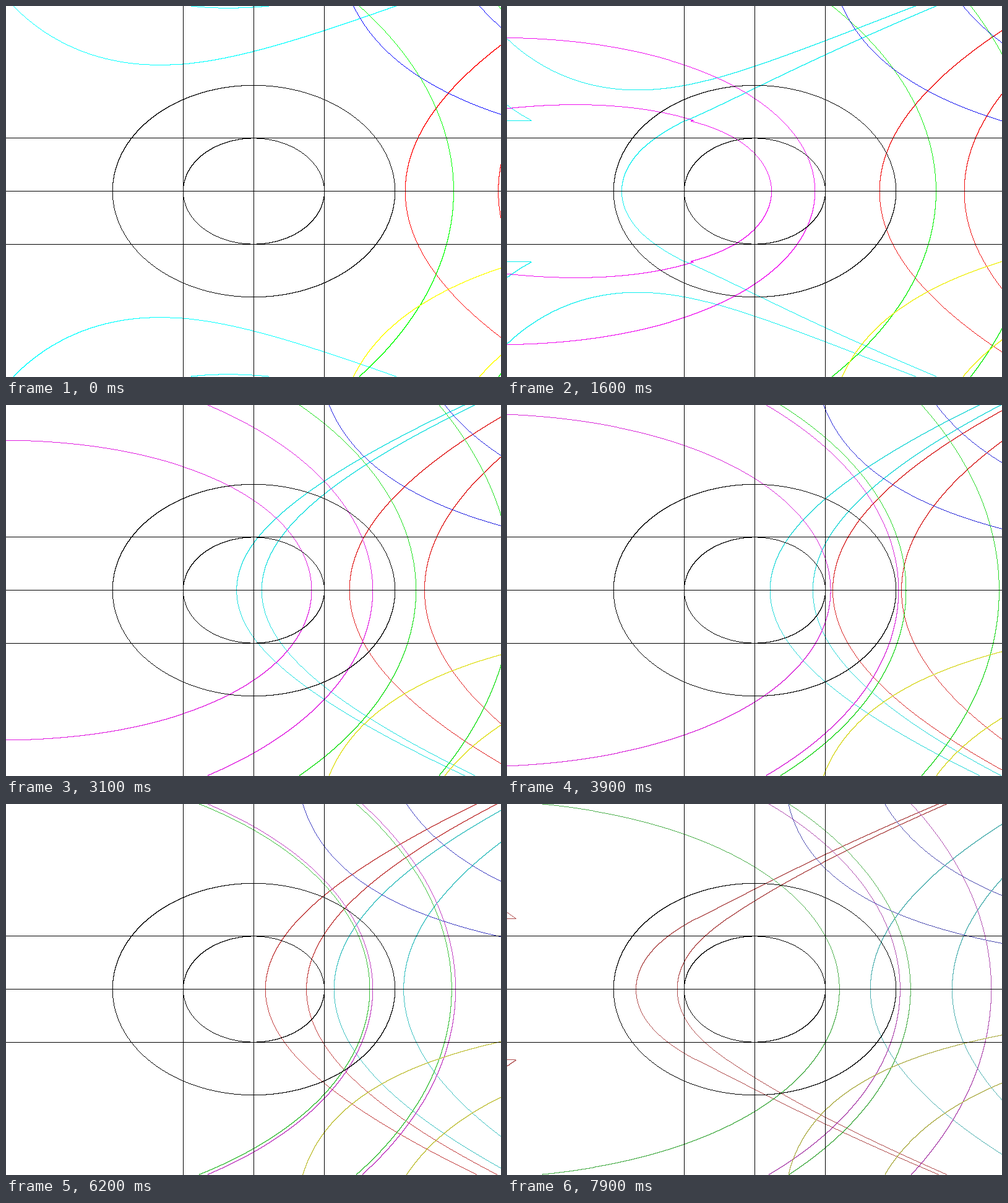
These frames come from a looping animation (800 px wide and 600 px high, 8000 ms). A matplotlib script:

```python
import numpy as np
import matplotlib.pyplot as plt
from matplotlib.animation import FuncAnimation

W, H, FRAMES = 800, 600, 80
L = 0.318131505 + 1.337235701j   # fixed point of exp
SERIES = [0.000453, -0.000952, 0.024572, 0.2475, 0.876336, 0.498563]


def half_exp(z):
    """Half iterate of exp for Im z >= 0, cut to the left of L."""
    out = np.empty_like(z)
    low = z.imag <= L.imag
    near = low & (abs(z) <= abs(L))
    left = low & ~near & (z.real < 0)
    rest = ~(near | left)
    out[near] = np.polyval(SERIES, z[near])
    if left.any():
        out[left] = np.log(half_exp(np.exp(z[left])))
    if rest.any():
        out[rest] = np.exp(half_exp(np.log(z[rest])))
    return out


def edge(f, level):
    """Pixels where f - level changes sign to the left or below."""
    s = f > level
    m = np.zeros(s.shape, bool)
    m[:, 1:] |= s[:, 1:] != s[:, :-1]
    m[:-1] |= s[:-1] != s[1:]
    return m


x, y = np.meshgrid(np.linspace(-3.5, 3.5, W), np.linspace(3.5, -3.5, H))
p = half_exp(x + 1j * abs(y))
re, im, mod = p.real, np.where(y < 0, -p.imag, p.imag), abs(p)

grid = np.zeros((H, W), bool)
for r in (1, 2):
    grid |= edge(np.hypot(x, y), r)
for c in (-1, 0, 1):
    grid |= edge(x, c) | edge(y, c)

# field, level at the start, change per step, colour switches
CURVES = [
    (re, 3.75, -0.05, (1, 0, 0)),
    (re, -1.25, 0.05, (0, 1, 1)),
    (mod, 5.5, -0.045, (0, 1, 0)),
    (mod, 0, 0.045, (1, 0, 1)),
    (im, 5, -0.025, (0, 0, 1)),
    (im, -5, 0.025, (1, 1, 0)),
]


def render(n):
    img = np.full((H, W, 3), 255, np.uint8)
    for field, start, rate, rgb in CURVES:
        color = [255 - n if on else n for on in rgb]
        for k in (1, 2):
            img[edge(field, k * (start + rate * n))] = color
    img[grid] = 0
    return img


fig = plt.figure(figsize=(W / 100, H / 100), dpi=100, facecolor="white")
pic = fig.figimage(render(0))


def update(n):
    pic.set_data(render(n))
    return [pic]


anim = FuncAnimation(fig, update, frames=FRAMES, interval=100, repeat=True)
plt.show()
```
